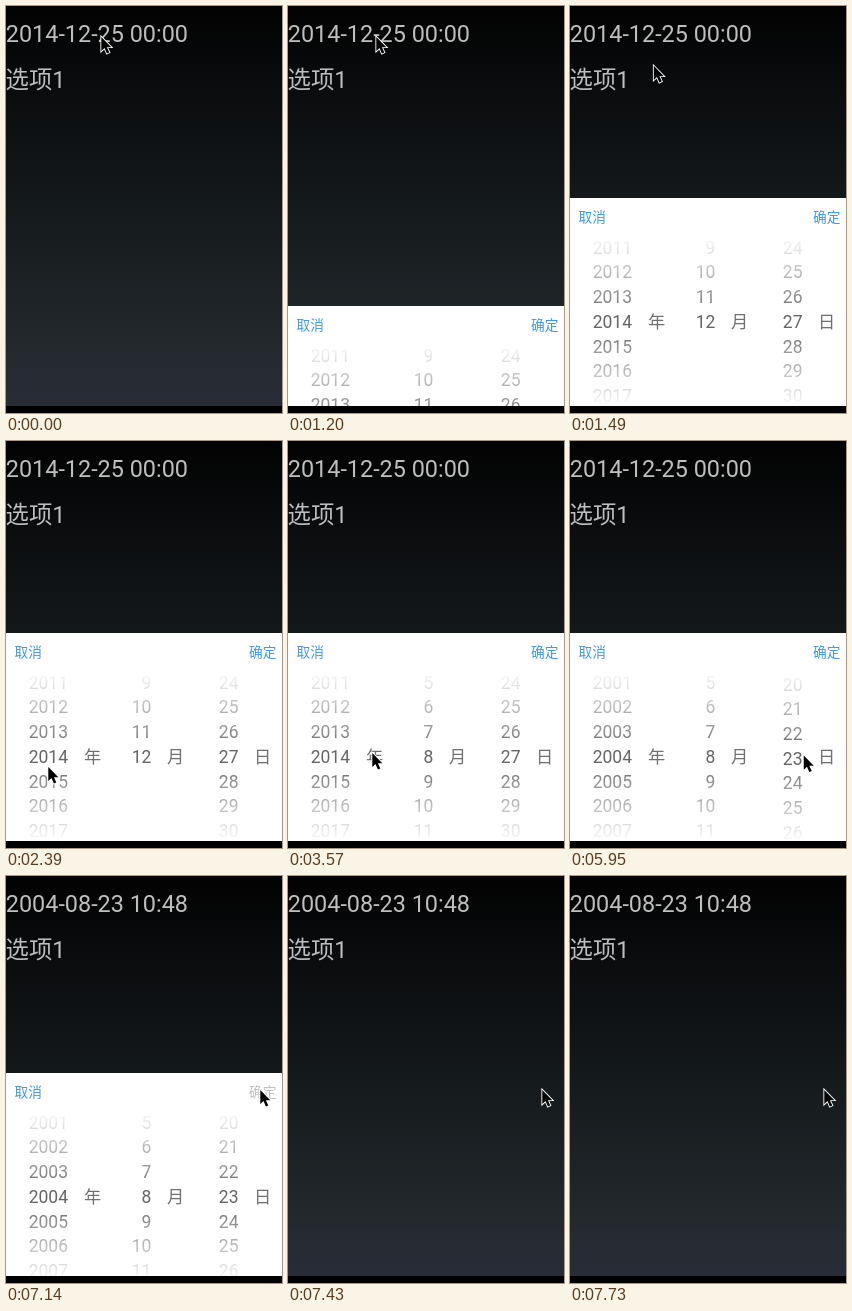
Write an HTML page with a canvas that moves like this. It is 276 px wide and 407 px high and loops after 8000 ms.

```html
<!DOCTYPE html>
<html lang="zh">
<head>
<meta charset="utf-8">
<title>日期选择</title>
<style>
  html, body { margin: 0; width: 100%; height: 100%; overflow: hidden; background: #000; }
  canvas { display: block; width: 276px; height: 407px; }
</style>
</head>
<body>
<canvas id="stage"></canvas>
<script>
const W = 276, H = 407, FLOOR = 400;
const LOOP = 8000, START = 1050, STEP = 148.45;
const REST = 192, SLIDE = 300, OPEN = 1114, PRESS = 6985, CLOSE = 7089;
const ROW = 24.7, CENTER = 123.6, SLACK = 0.2;
const FONT = 'Roboto, "Noto Sans CJK SC", "Noto Sans CJK", sans-serif';
const BLUE = '#3f98ee', GRAY = '#c2c2c2', PALE = '#bebebe';

// Pointer stops: time, x, y
const stops = [
  [902, 95, 30], [1050, 88, 30], [1350, 88, 30], [2100, 42, 325], [2390, 42, 325],
  [2690, 136, 285], [3280, 142, 365], [3573, 84, 311], [3750, 50, 280],
  [4460, 62, 365], [4910, 103, 400], [5350, 222, 270], [5800, 226, 350], [6240, 254, 213]
];

const wheels = [
  { from: 2014, to: 2004, start: 3700, end: 5000, right: 62, unit: '年', unitX: 78 },
  { from: 12, to: 8, start: 2800, end: 3400, right: 145.3, unit: '月', unitX: 161, max: 12 },
  { from: 27, to: 23, start: 5450, end: 6050, right: 232.5, unit: '日', unitX: 248, max: 31 }
];

const canvas = document.getElementById('stage');
const ctx = canvas.getContext('2d');
const ratio = window.devicePixelRatio || 1;
canvas.width = W * ratio;
canvas.height = H * ratio;
ctx.scale(ratio, ratio);

const mix = (a, b, p) => a + (b - a) * p;
const progress = (t, start, end) => Math.min(1, Math.max(0, (t - start) / (end - start)));
const easeIn = p => p * p;
const easeOut = p => 1 - (1 - p) ** 2;
const smooth = p => p * p * (3 - 2 * p);

function pointerAt(t) {
  const i = stops.findIndex(stop => stop[0] > t);
  if (i < 0) return stops[stops.length - 1].slice(1);
  if (i === 0) return stops[0].slice(1);
  const [t0, x0, y0] = stops[i - 1], [t1, x1, y1] = stops[i];
  const p = smooth(progress(t, t0, t1));
  return [mix(x0, x1, p), mix(y0, y1, p)];
}

function panelTop(t) {
  const shown = easeOut(progress(t, OPEN, OPEN + SLIDE)) - easeIn(progress(t, CLOSE, CLOSE + SLIDE));
  return Math.round(mix(FLOOR + 1, REST, shown));
}

// A wheel runs slightly past its row, then snaps onto it.
function wheelValue({ from, to, start, end }, t) {
  return t >= end ? to : mix(from, to - SLACK, easeOut(progress(t, start, end)));
}

function text(str, x, y, size, color, align = 'left') {
  ctx.font = `${size}px ${FONT}`;
  ctx.fillStyle = color;
  ctx.textAlign = align;
  ctx.fillText(str, x, y);
}

function gradient(y0, y1, colors) {
  const g = ctx.createLinearGradient(0, y0, 0, y1);
  for (const [offset, color] of colors) g.addColorStop(offset, color);
  return g;
}

function drawPage(t) {
  ctx.fillStyle = '#000';
  ctx.fillRect(0, 0, W, H);
  ctx.fillStyle = gradient(0, FLOOR, [
    [0, '#020202'], [0.25, '#0c0e10'], [0.5, '#14191c'], [0.85, '#23282c'], [0.92, '#272b34'], [1, '#282c36']
  ]);
  ctx.fillRect(0, 0, W, FLOOR);
  text(t < CLOSE ? '2014-12-25 00:00' : '2004-08-23 10:48', -0.2, 36, 23.4, PALE);
  text('选项1', -0.5, 82.3, 23.4, PALE);
}

function drawWheel(wheel, t) {
  const value = wheelValue(wheel, t), middle = Math.round(value);
  const base = CENTER + 6.2;
  const last = Math.min(middle + 3, wheel.max || Infinity);
  for (let n = middle - 3; n <= last; n++) {
    text(n, wheel.right, base + (n - value) * ROW, 17.5, '#666', 'right');
  }
  text(wheel.unit, wheel.unitX, base, 17.2, '#707070');
}

function fade(side) {
  const from = CENTER + side * 12, to = CENTER + side * 86;
  ctx.fillStyle = gradient(from, to, [
    [0, 'rgba(255,255,255,0)'], [0.14, 'rgba(255,255,255,.24)'], [1, '#fff']
  ]);
  ctx.fillRect(0, Math.min(from, to), W, 74);
}

function drawPanel(t) {
  const top = panelTop(t);
  if (top >= FLOOR) return;
  ctx.save();
  ctx.beginPath();
  ctx.rect(0, top, W, FLOOR - top);
  ctx.clip();
  ctx.translate(0, top);
  ctx.fillStyle = '#fff';
  ctx.fillRect(0, 0, W, H);
  wheels.forEach(wheel => drawWheel(wheel, t));
  fade(-1);
  fade(1);
  text('取消', 8.5, 24.2, 13.7, BLUE);
  text('确定', 243, 24.2, 13.7, t < PRESS ? BLUE : GRAY);
  ctx.restore();
}

function drawPointer(t) {
  const [x, y] = pointerAt(t);
  const arrow = new Path2D('M0 0V14.2L3.2 11.2L5.6 16.6L8 15.5L5.6 10.3H10Z');
  ctx.save();
  ctx.translate(x + 0.3, y + 0.9);
  ctx.lineWidth = 1.8;
  ctx.strokeStyle = '#fff';
  ctx.stroke(arrow);
  ctx.fillStyle = '#000';
  ctx.fill(arrow);
  ctx.restore();
}

const begin = performance.now();

// The picture advances in even ticks, each holding one pose.
function draw() {
  const elapsed = Math.max(0, performance.now() - begin) % LOOP;
  const tick = Math.max(-1, Math.floor((elapsed - START + 5) / STEP));
  const t = START + tick * STEP;
  drawPage(t);
  drawPanel(t);
  drawPointer(t);
  requestAnimationFrame(draw);
}
draw();
</script>
</body>
</html>
```
